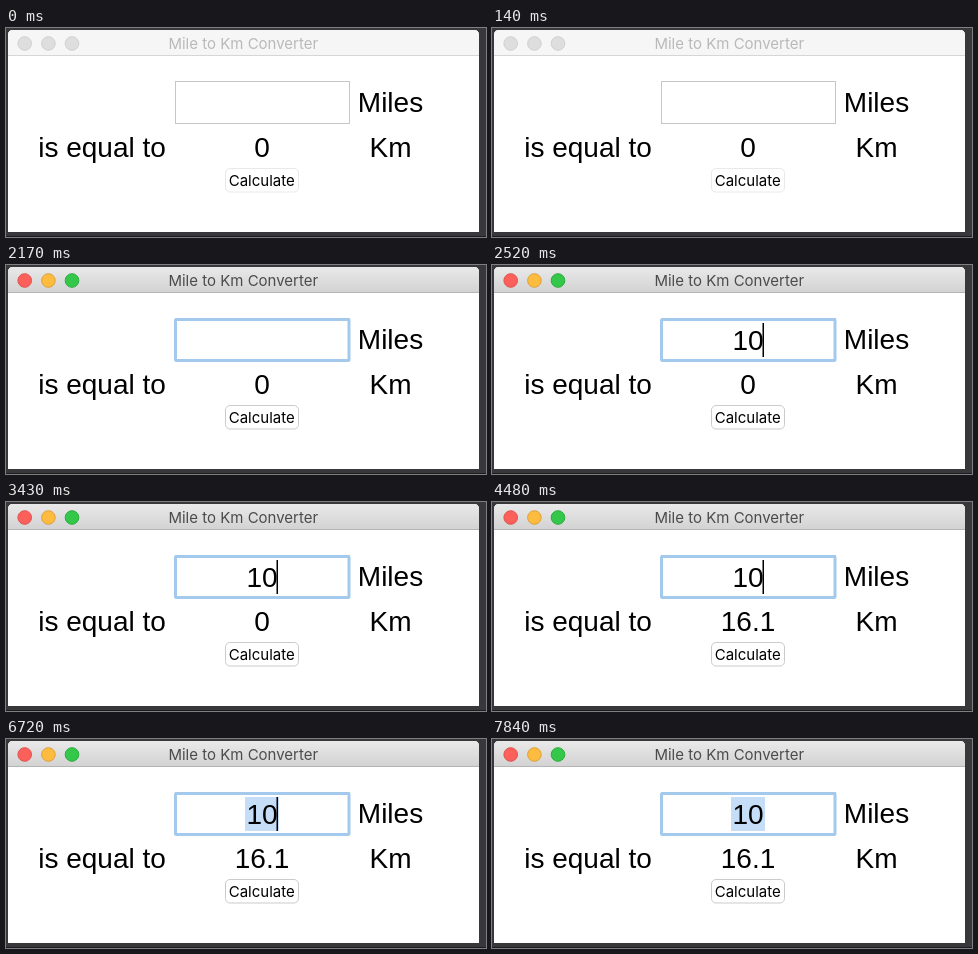
An HTML page for the animation above (8000 ms loop, 480 by 209 pixels).

```html
<!DOCTYPE html>
<html lang="en">
<head>
<meta charset="utf-8">
<title>Mile to Km Converter</title>
<style>
  html, body { margin: 0; width: 100%; height: 100%; overflow: hidden; background: #38383a; }
  svg { display: block; width: 100%; height: 100%; }
  text { text-anchor: middle; fill: #000; font: 28px "Liberation Sans", Arial, sans-serif; }
  .ui { font: 15px Inter, sans-serif; }
  .title { fill: #4b4b4b; }
  .lights { stroke-width: 1; }
  .focus { fill: #fff; stroke: #a3caec; stroke-width: 3; }
  .button { fill: #fff; stroke: #cbcbcb; }

  .inactive .bar { fill: #f6f6f6; }
  .inactive .separator { stroke: #d6d6d6; }
  .inactive .title { fill: #b9b9b9; }
  .inactive .lights circle { fill: #dedede; stroke: #d0d0d0; }
  .inactive .focus { display: none; }
  .inactive .button { stroke: #e9e9e9; }
</style>
</head>
<body>
<svg id="stage" viewBox="0 0 480 209">
  <defs>
    <linearGradient id="chrome" x2="0" y2="1">
      <stop stop-color="#e9e9e9"/>
      <stop offset="1" stop-color="#d2d2d2"/>
    </linearGradient>
  </defs>

  <rect width="480" height="209" fill="#38383a"/>
  <path d="M0 208.5H480" stroke="#1c1c1e"/>
  <path d="M2 204V7Q2 2 7 2H468Q473 2 473 7V204Z" fill="#fff"/>
  <path class="bar" d="M2 28V7Q2 2 7 2H468Q473 2 473 7V28Z" fill="url(#chrome)"/>
  <path class="separator" d="M2 27.5H473" stroke="#b4b4b4"/>
  <g class="lights">
    <circle cx="18.7" cy="15.5" r="6.8" fill="#fc605b" stroke="#e2504b"/>
    <circle cx="42.4" cy="15.5" r="6.8" fill="#fdbc40" stroke="#dfa035"/>
    <circle cx="66" cy="15.5" r="6.8" fill="#34c84a" stroke="#2aab3b"/>
  </g>
  <text class="ui title" x="237.3" y="21">Mile to Km Converter</text>

  <rect x="169.5" y="53.5" width="174" height="42" fill="#fff" stroke="#c6c6c6"/>
  <rect class="focus" x="169.5" y="54.5" width="173.5" height="41" rx="1"/>
  <rect id="selection" x="239" y="58" width="34" height="34" fill="#c5ddf6"/>
  <text id="entry" x="256" y="85"></text>
  <rect id="caret" y="58" width="1.5" height="34"/>

  <text x="384.5" y="84">Miles</text>
  <text x="96" y="128.5">is equal to</text>
  <text id="result" x="256" y="128.5">0</text>
  <text x="384.5" y="128.5">Km</text>

  <rect class="button" x="219.5" y="140.5" width="73" height="23.5" rx="4.5"/>
  <text class="ui" x="255.7" y="157.7">Calculate</text>
</svg>
<script>
  const LOOP = 8000;
  const ACTIVATE = 560, TYPE_FIRST = 2380, TYPE_SECOND = 2450, CALCULATE = 3850, SELECT = 6160;
  const DIGIT_WIDTH = 15.3;
  // The caret flips at each of these times, starting hidden.
  const caretFlips = [560, 1190, 1540, 2170, 2520, 3080, 3430, 4060,
                      4340, 4970, 5320, 5950, 6230, 6860, 7210, 7840];

  const [stage, selection, entry, caret, result] =
    ["stage", "selection", "entry", "caret", "result"].map(id => document.getElementById(id));
  const show = (element, visible) => element.setAttribute("visibility", visible ? "visible" : "hidden");

  function render(time) {
    const digits = time < TYPE_FIRST ? "" : time < TYPE_SECOND ? "1" : "10";
    stage.classList.toggle("inactive", time < ACTIVATE);
    entry.textContent = digits;
    result.textContent = time < CALCULATE ? "0" : (digits * 1.609).toFixed(1);
    caret.setAttribute("x", 255.2 + digits.length * DIGIT_WIDTH / 2);
    show(caret, caretFlips.filter(flip => flip <= time).length % 2);
    show(selection, time >= SELECT);
  }

  const start = performance.now();
  function tick() {
    render((performance.now() - start) % LOOP);
    requestAnimationFrame(tick);
  }
  tick();
</script>
</body>
</html>
```
